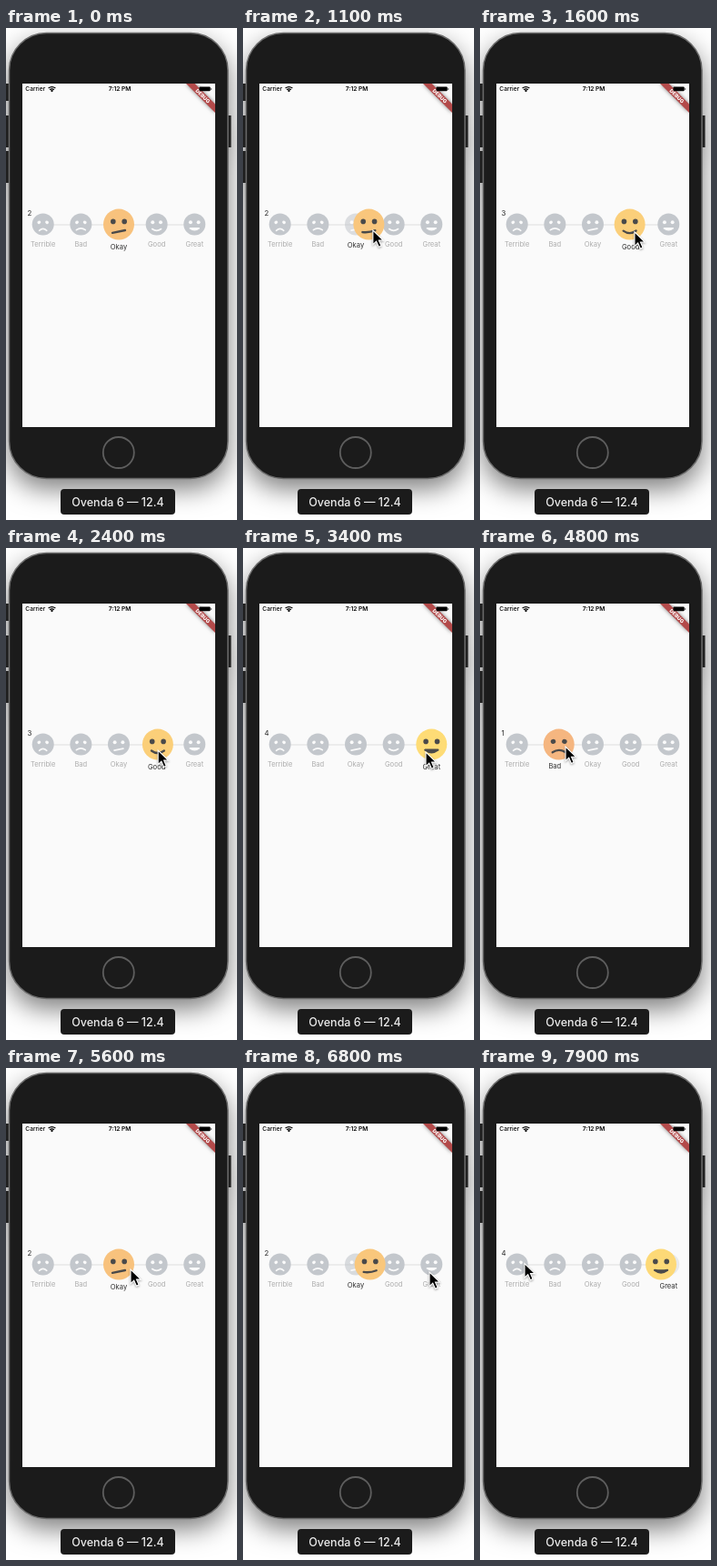
Write an HTML page that moves like this. It is 254 px wide and 540 px high and loops after 8000 ms.

```html
<!DOCTYPE html>
<html lang="en">
<head>
<meta charset="utf-8">
<title>Review slider</title>
<style>
html, body { margin: 0; width: 100%; height: 100%; overflow: hidden; background: #fff; }
svg { display: block; width: 254px; height: 540px; }
text { font-family: Inter, Roboto, sans-serif; }
.device { filter: drop-shadow(0 11px 14px rgba(0, 0, 0, .5)); }
.status { font-size: 6.6px; font-weight: 600; }
.label { font-size: 7.6px; text-anchor: middle; fill: #adadad; }
.label.on { fill: #303030; }
.ribbon { filter: drop-shadow(0 0 2px rgba(0, 0, 0, .5)); }
.pointer { filter: drop-shadow(0 1px 1px rgba(0, 0, 0, .35)); }
</style>
</head>
<body>
<svg viewBox="0 0 254 540">
  <defs><clipPath id="screen"><rect x="18" y="61" width="212" height="377"/></clipPath></defs>

  <g class="device">
    <path fill="#202020" d="M0 61h4v19h-4zM0 96h4v35h-4zM0 135h4v35h-4zM243 96h4.5v35h-4.5z"/>
    <rect x="3.5" y="5.5" width="240.5" height="489" rx="41" fill="#1b1b1b" stroke="#6c6c6c" stroke-width="1.5"/>
  </g>
  <circle cx="123.8" cy="466" r="17" fill="none" stroke="#5e5e5e" stroke-width="1.8"/>
  <rect x="18" y="61" width="212" height="377" fill="#fafafa"/>

  <g class="status">
    <text x="21.3" y="69.2" font-weight="500">Carrier</text>
    <text x="125" y="69.2" text-anchor="middle">7:12 PM</text>
  </g>
  <g fill="none" stroke="#000" stroke-width="1.3">
    <path d="M46.6 66.1q3.9-3 7.8 0M48.1 67.7q2.4-1.8 4.8 0"/>
    <circle cx="50.5" cy="69" r=".5"/>
  </g>
  <g clip-path="url(#screen)">
    <path class="ribbon" fill="#b34a4a" d="M198 61h9.6L230 83.4V93z"/>
    <text transform="translate(216.4 74.6) rotate(45)" y="2" text-anchor="middle" fill="#fff" font-size="5.6" font-weight="800">DEBUG</text>
  </g>
  <rect x="212.5" y="64.5" width="12.2" height="4.8" rx="1" fill="#000"/>
  <rect x="225.2" y="65.9" width="1" height="2" rx=".5" fill="#555"/>

  <path d="M41 216H207" stroke="#ececec" stroke-width="2"/>
  <g id="scale"></g>
  <text id="count" x="23.6" y="206.2" font-size="7.9" fill="#262626"></text>
  <g id="active"></g>
  <path id="pointer" class="pointer" d="M0 0V15.6L3.7 12.1L6.4 18.3L9.1 17.1L6.5 11.1H11.4Z" fill="#000" stroke="#fff" stroke-width="1.1"/>

  <rect x="60" y="506" width="126" height="28" rx="4" fill="#1b1b1b"/>
  <text x="123" y="525.4" text-anchor="middle" font-size="12.5" font-weight="500" fill="#ececec">Ovenda 6 — 12.4</text>
</svg>
<script>
const LOOP = 8000, STEP = 100;
const NAMES = ['Terrible', 'Bad', 'Okay', 'Good', 'Great'];
const xOf = mood => 40.7 + mood * 41.65;
const clamp = (v, low = 0, high = 1) => Math.max(low, Math.min(high, v));
const ease = p => (1 - Math.cos(Math.PI * clamp(p))) / 2;

// Gestures: when the slider moves and where the pointer ends up
const GESTURES = [
  { from: 50, to: 700, x: 128, y: 221 },
  { from: 700, to: 1700, mood: 3, x: 171, y: 224 },
  { from: 1700, to: 2100, x: 166, y: 222 },
  { from: 2300, to: 3200, mood: 4, x: 205, y: 224 },
  { from: 3200, to: 3400, x: 201, y: 224 },
  { from: 3400, to: 4400, mood: 0, x: 46, y: 217 },
  { from: 4400, to: 5150, mood: 2, x: 133, y: 219 },
  { from: 5150, to: 5600, x: 137, y: 221 },
  { from: 5900, to: 6400, x: 205, y: 224 },
  { from: 6600, to: 7300, mood: 4 },
  { from: 7450, to: 7600, x: 31, y: 212 },
  { from: 7600, to: 7700, x: 49, y: 214.5 },
  { from: 7800, to: 8500, mood: 0 },
];

function stateAt(time) {
  const state = { mood: 2, x: 148, y: 236 };
  for (const { from, to, ...goal } of GESTURES) {
    const p = ease((time - from) / (to - from));
    for (const key in goal) state[key] += (goal[key] - state[key]) * p;
  }
  return state;
}

const skinOf = mood => `rgb(${242 + 3 * mood}, ${168 + 13 * mood}, ${132 - 3.5 * mood})`;

function face(x, mood, radius, skin, ink) {
  const sad = clamp(2 - mood), open = clamp(mood - 3);
  const half = 7 - 1.2 * clamp(1 - mood);
  const y = 9.5 - .85 * mood;
  const tilt = 1.4 * clamp(1 - Math.abs(mood - 2));
  const bend = 5.2 * clamp(mood - 2, -1, 1);
  const eye = side => `<ellipse rx="2.8" ry="${2.8 - sad * .4}" fill="${ink}"
    transform="translate(${side * 6.2} -3.2) rotate(${side * sad * 22})"/>`;
  return `<g transform="translate(${x} 215.6) scale(${radius / 17})">
    <circle r="17" fill="${skin}"/>${eye(-1)}${eye(1)}
    <path d="M${-half} ${y + tilt}Q0 ${y + bend * (1 - open)} ${half} ${y - tilt}Q0 ${y + bend} ${-half} ${y + tilt}Z"
      fill="${ink}" stroke="${ink}" stroke-width="2.3" stroke-linejoin="round"/></g>`;
}

const $ = id => document.getElementById(id);
$('scale').innerHTML = NAMES.map((name, i) =>
  `<g class="dot">${face(xOf(i), i, 12, '#c3c7cc', '#fafafa')}</g>
   <text class="label" x="${xOf(i)}">${name}</text>`).join('');
const dots = document.querySelectorAll('.dot');
const labels = document.querySelectorAll('.label');

function draw(time) {
  const { mood, x, y } = stateAt(time);
  const selected = Math.round(mood);
  $('active').innerHTML = face(xOf(mood), mood, 17, skinOf(mood), '#4a4a4a');
  $('count').textContent = selected;
  labels.forEach((label, i) => {
    const away = clamp(1.6 * Math.abs(mood - i));
    dots[i].setAttribute('opacity', away);
    label.classList.toggle('on', i === selected);
    label.setAttribute('y', 242.8 - 3 * away);
  });
  $('pointer').setAttribute('transform', `translate(${x} ${y})`);
  $('pointer').style.display = time < STEP ? 'none' : '';
}

const start = performance.now();
let shown = -1;
function tick() {
  const elapsed = Math.max(0, performance.now() - start) % LOOP;
  const time = Math.floor(elapsed / STEP) * STEP;
  if (time !== shown) draw(shown = time);
  requestAnimationFrame(tick);
}
tick();
</script>
</body>
</html>
```
